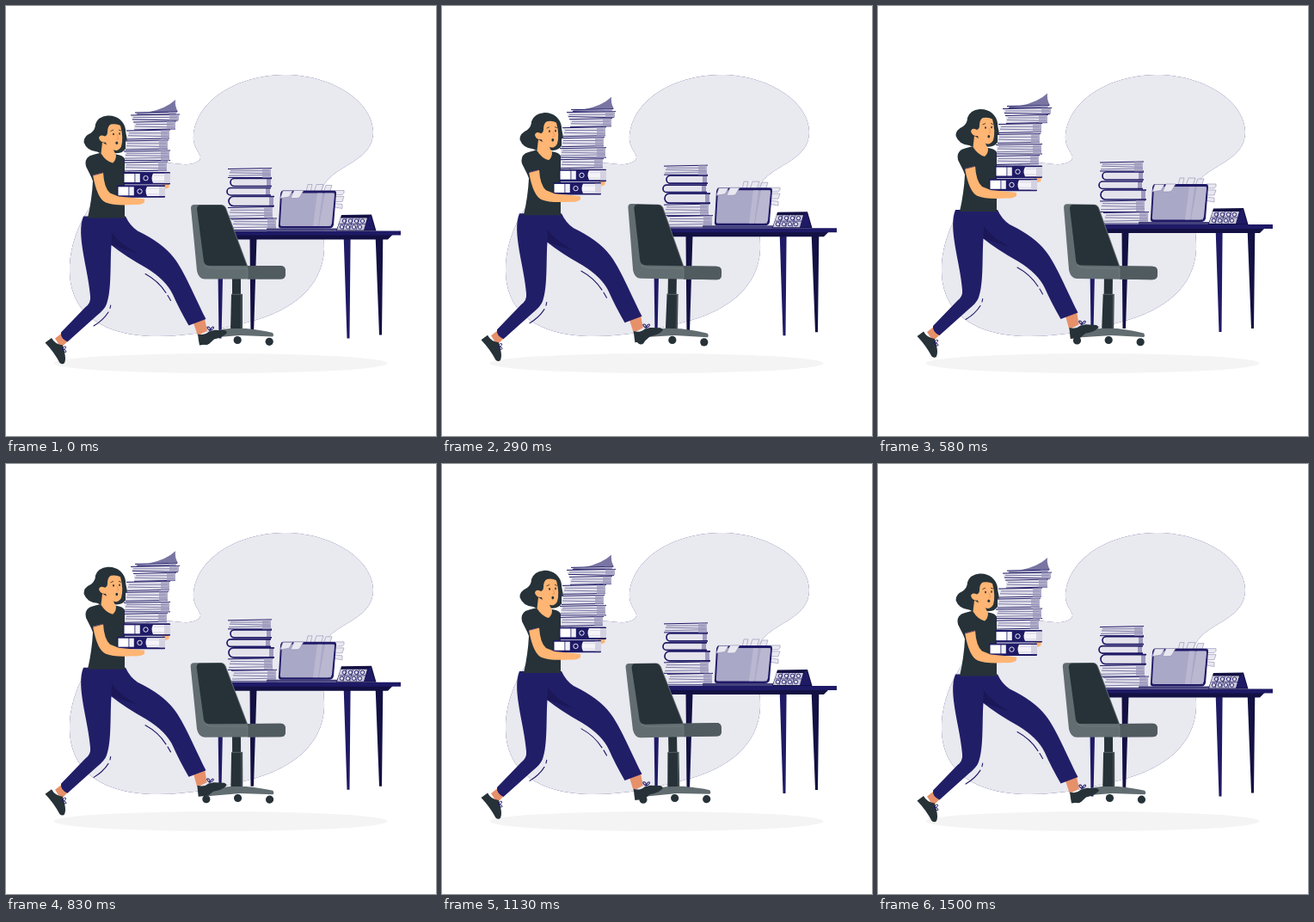
An HTML page for the animation above (1.54 s loop, 500 by 500 pixels).

```html
<!DOCTYPE html>
<html lang="en">
<head>
<meta charset="utf-8">
<title>Paperwork</title>
<style>
  html, body { margin: 0; width: 100%; height: 100%; overflow: hidden; background: #fff; }
  svg { display: block; width: 100%; height: 100%; }
  .navy { fill: #1f1a66; }
  .pants { fill: #211e68; }
  .deep { fill: #131043; }
  .dark { fill: #263238; }
  .grey { fill: #626d71; }
  .skin { fill: #ffb573; }
  .ankle { fill: #e6916a; }
  .lace { fill: none; stroke: #1f1a66; stroke-width: 1; }
  .swish { fill: none; stroke: #1f1a66; stroke-width: 1.1; stroke-linecap: round; }
  .tab { fill: #e9e8f0; stroke: #8f8cb2; stroke-width: .6; }
</style>
</head>
<body>
<svg viewBox="0 0 500 500">
  <defs>
    <path id="blob" d="M322 80C377 79 426 110 427 146C427 181 384 184 370 208C359 228 371 252 370 283C368 329 329 354 291 365C251 376 216 384 176 384C112 384 75 357 74 309C73 268 97 219 140 194C164 180 188 182 205 184C217 185 227 181 226 175C224 168 217 164 218 150C222 109 269 81 322 80Z"/>
  </defs>
  <use href="#blob" class="navy"/>
  <use href="#blob" fill="#fff" opacity=".9"/>
  <ellipse cx="249.5" cy="415.5" rx="194" ry="11.5" fill="#f4f4f4"/>

  <g id="desk">
    <path class="deep" d="M283.500 270H291.500L288 383H284.500ZM429.700 270H438.300L437 383H434Z"/>
    <path class="navy" d="M246 270H253L250.500 387H247.500ZM392.700 270H400.600L399.500 387H396.500Z"/>
    <path class="deep" d="M240 266H450L444 272H240Z"/>
    <path class="navy" d="M238 262H459V267H238Z"/>
    <g id="books"></g>
    <path fill="#45417c" d="M303 259H385V262H303Z"/>
    <g id="folder">
      <path class="tab" d="M349 217L351 208H356L354 217ZM358 217L361 208H369L366 217ZM369 217L372 209H379L376 218Z"/>
      <path class="tab" d="M382 215L393 215Q394 218 391 220H382ZM382 222H393L391 228H382ZM381 230L391 231V236L380 234Z"/>
      <path class="navy" d="M322 215H381Q384 215 384 218L381 255Q380 259 376 259H320Q316 259 317 254L319 219Q320 215 322 215Z"/>
      <path fill="#aaa8c7" d="M321 218H380Q382 218 382 220L379 253Q378 256.500 374 256.500H321Q318 256.500 319 252Z"/>
      <path fill="#c3c1d8" d="M362 218H368L363 256.500H357ZM371 218H382L378 256.500H364Z" opacity=".65"/>
      <path class="tab" d="M319 224L322 215.500H333L330 221Q329 223 326 223ZM331 224L335 215H346L342 222Q341 224 338 224Z"/>
    </g>
    <g id="calendar">
      <path class="deep" d="M390 243.500L425 243L430.500 262H384Z"/>
      <path class="navy" d="M421 247L424 244L429 261H416Z"/>
      <path fill="#c9c7db" d="M389 247H420L416 261H385Z"/>
    </g>
  </g>

  <g id="chair">
    <g class="dark">
      <path d="M263 316H273V336H263ZM262 335H275V378H261Z"/>
      <circle cx="232.500" cy="389.500" r="4.600"/>
      <circle cx="269.200" cy="388.500" r="4.600"/>
      <circle cx="306.200" cy="390.300" r="4.600"/>
    </g>
    <path d="M262 335.300H275M273.800 336V375" stroke="#626d71" stroke-width=".8"/>
    <path class="grey" d="M229 382Q246 376 260 375H279Q298 377 310 380Q312 383 310 384.500L272 383L234 386Q229 386 229 382Z"/>
    <path class="grey" d="M215 235Q215 231 219 231H250Q254 231 256 235L281 302H319Q325 302 325 308V312Q325 317.500 319 317.500H231Q224 317.500 222 308Z"/>
    <path class="dark" d="M222 236Q222 231.500 226 231.500H250Q253 231.500 255 235L280 302H237Q231 302 230 297Z"/>
    <path fill="#505b60" d="M281 302H319Q325 302 325 308V312Q325 317.500 319 317.500H281Z"/>
    <path d="M231 302Q236 305 243 305H281V317" fill="none" stroke="#7b8588" stroke-width=".6"/>
  </g>

  <g id="woman">
    <path class="ankle" d="M57 387L66 380L73 389L64 398Z"/>
    <path class="dark" d="M45.500 392L53 386.500Q57 394 66 395L68 403Q70 411 68 415.500Q66 418 62.500 415.500Q56 403 45.500 392Z"/>
    <path class="lace" d="M65 399Q70 394 69.500 398Q68 401 65 399Q69 405 70 402.500Q70 400 65 399"/>
    <g id="step">
      <path class="ankle" d="M218 369L231 364L234 378L223 384Z"/>
      <path class="dark" d="M223 382Q231 384 236 379L242 377.500L254 377.500Q258 379 256.500 381Q252 386 242 388L236 393.500L225 395Q224 390 223 382Z"/>
      <path class="lace" d="M237 378Q232 374 235 373.500Q238 374 237 378Q240 372 241.500 374Q242 376 237 378"/>
    </g>
    <path class="pants" d="M90 245H139Q144 256 153 262Q182 276 195 293C207 308 219 338 232.500 364.500L212.500 372Q201 352 194 336Q186 319 163 305Q138 291 122.500 278.500C121 298 123 331 117 347Q115 353 105 361L71.500 391Q63 387 64 380L92 351Q99 346 98 338C96 308 81 266 90 245Z"/>
    <path fill="#1b1758" d="M123 264Q132 277 153 288Q133 282 122.500 278Z"/>
    <path class="swish" d="M162 312Q177 320 186 334M188 337L191.500 343M102 372.500Q113 366 119 356.500M121 352L121.700 348.500"/>

    <path class="dark" d="M118 128C128 127 138 134 139 144C139 151 143 157 140 165Q135 174 123 171Q114 175 106 170Q94 169 90.500 159Q90 152 99 148Q104 144 104 138Q107 129 118 128Z"/>
    <path class="dark" d="M111 171Q102 173 97 175Q91 179 93 187L99 199L101 204Q100 225 95 247H138V178Q136 174 128 173Z"/>
    <path class="skin" d="M112 159L110.500 172Q116 181 124 183Q128 180 128 174L124 166Z"/>
    <path class="skin" d="M118 147Q118 140 122 138Q129 137 133 139.500Q137 154 134 164Q130 171 123 167Q117 165 116 159Q110 160 108 154Q109 149 115 152Q118 151 118 147Z"/>
    <path d="M121.500 146L125 144.500M131 144.500L134 145.500" stroke="#263238" stroke-width=".8" fill="none"/>
    <g class="dark">
      <ellipse cx="125" cy="149.500" rx=".9" ry="1.300"/>
      <ellipse cx="132" cy="149" rx=".8" ry="1.300"/>
      <ellipse cx="128.800" cy="159.700" rx="1.400" ry="1.800"/>
    </g>
    <path d="M129 150L131 155L128.500 155.500" fill="none" stroke="#e58b55" stroke-width=".7"/>
    <path class="skin" d="M182 208L187 206Q191 208 189 212L183 214Z"/>
    <g id="stack"></g>
    <path class="skin" d="M101 197L113 194Q114 212 121 218L131 222L152 224L161 225V229Q157 232 148 231.500Q126 233 116 229Q106 225 101 197Z"/>
    <path d="M99 198L114 194" stroke="#1f1a66" stroke-width=".7"/>
  </g>
</svg>
<script>
const NS = 'http://www.w3.org/2000/svg';
const $ = id => document.getElementById(id);
const NAVY = '#1f1a66', PAGE = '#e4e3ec', SHADE = '#9d99bd';

function add(parent, tag, attrs) {
  const el = document.createElementNS(NS, tag);
  for (const key in attrs) el.setAttribute(key, attrs[key]);
  return parent.appendChild(el);
}
const box = (p, x, y, width, height, fill, more) =>
  add(p, 'rect', { x, y, width, height, fill, ...more });
const line = (p, d, width = .8, stroke = NAVY) =>
  add(p, 'path', { d, fill: 'none', stroke, 'stroke-width': width });

// Loose sheets with slightly tilted edges and a shaded end.
function sheets(p, x, y, w, h, sw = 11) {
  box(p, x + 1, y, w - 2, h, PAGE);
  const n = Math.max(2, Math.round(h / 3));
  for (let i = 0; i <= n; i++) {
    const ly = y + h * i / n;
    const tilt = i % 3 - 1;
    const inset = i * 3 % 4;
    const edge = i === 0 || i === n;
    line(p, `M${x + inset} ${ly - tilt * .5}L${x + w - inset} ${ly + tilt * .5}`,
      edge ? 1 : .7, edge ? NAVY : '#504c8a');
  }
  box(p, x + w - sw, y - .4, sw - 1, h + .8, SHADE, { opacity: .72 });
}

function book(p, x, y, w, h) {
  box(p, x + 4, y + 1, w - 5, h - 2, PAGE);
  box(p, x + w - 6, y + 1, 5, h - 2, SHADE);
  const r = h / 2 - 1;
  line(p, `M${x + w} ${y + 1}H${x + r + 1}A${r} ${r} 0 0 0 ${x + r + 1} ${y + h - 1}H${x + w}`, 1.7);
}

function binder(p, x, y, w) {
  box(p, x, y, w, 14.5, NAVY, { rx: 1 });
  box(p, x + 1.5, y + 2, 12, 10, '#fff');
  box(p, x + 14.3, y + 2, 5.5, 10, '#f1f0f6');
  add(p, 'path', {
    d: `M${x + w} ${y + 1.7}H${x + 35}Q${x + 32} ${y + 7} ${x + 35} ${y + 12.7}H${x + w}Z`,
    fill: '#f4f3f8'
  });
  line(p, `M${x + 36} ${y + 4}H${x + w}M${x + 35} ${y + 10.5}H${x + w}`, .5, '#bebbd2');
  box(p, x + w - 7, y + 1.7, 7, 11, '#d4d2e1');
  add(p, 'circle', { cx: x + 26.5, cy: y + 7.2, r: 2.7, fill: 'none', stroke: '#fff', 'stroke-width': .9 });
}

const books = $('books');
[[258, 234.5, 53, 13], [262, 248, 53, 13]].forEach(b => sheets(books, ...b));
book(books, 258, 221, 54, 13);
book(books, 256, 211, 52, 10.5);
book(books, 260, 200, 49, 11);
sheets(books, 258, 189.5, 51, 10.5);

const stack = $('stack');
add(stack, 'path', { d: 'M165 124Q186 120 197 109.500Q196 117 200 123.500Z', fill: '#7975a3' });
[[150, 124, 49, 3, 10], [145, 127, 57, 6, 12], [148, 135, 50, 9], [140, 145, 51, 10],
 [138, 157, 51, 10], [137, 169, 54, 11], [137, 182, 51, 10]].forEach(s => sheets(stack, ...s));
binder(stack, 136, 193.5, 55);
binder(stack, 129, 208.8, 56);

const calendar = $('calendar');
for (let i = 0; i < 8; i++) {
  const row = i >> 2, col = i % 4;
  add(calendar, 'circle', {
    cx: 393.5 + col * 7 - row * 3, cy: 250.5 + row * 7, r: 2.2,
    fill: '#dddce8', stroke: NAVY, 'stroke-width': .9
  });
}
line(calendar, 'M387.500 254H418M396 247L392 261M403.500 247L399.500 261M411 247L407 261', .7);

const LOOP = 1540, STEPS = 37, LIFT = 8.2, REST = .4;

function draw(now) {
  const k = Math.floor(now % LOOP / LOOP * STEPS + .05);
  const rise = (1 + Math.cos(2 * Math.PI * (k - 17.2) / STEPS)) / 2;
  const sway = 1.1 * Math.sin(2 * Math.PI * k / STEPS);
  const lift = `translate(0 ${-REST - LIFT * rise})`;
  $('desk').setAttribute('transform', lift);
  $('woman').setAttribute('transform', lift);
  $('step').setAttribute('transform', `rotate(${3 * rise} 225 370)`);
  $('chair').setAttribute('transform', `rotate(${sway} 270 312)`);
}

const start = performance.now();
function tick() {
  draw(performance.now() - start);
  requestAnimationFrame(tick);
}
draw(0);
requestAnimationFrame(tick);
</script>
</body>
</html>
```
